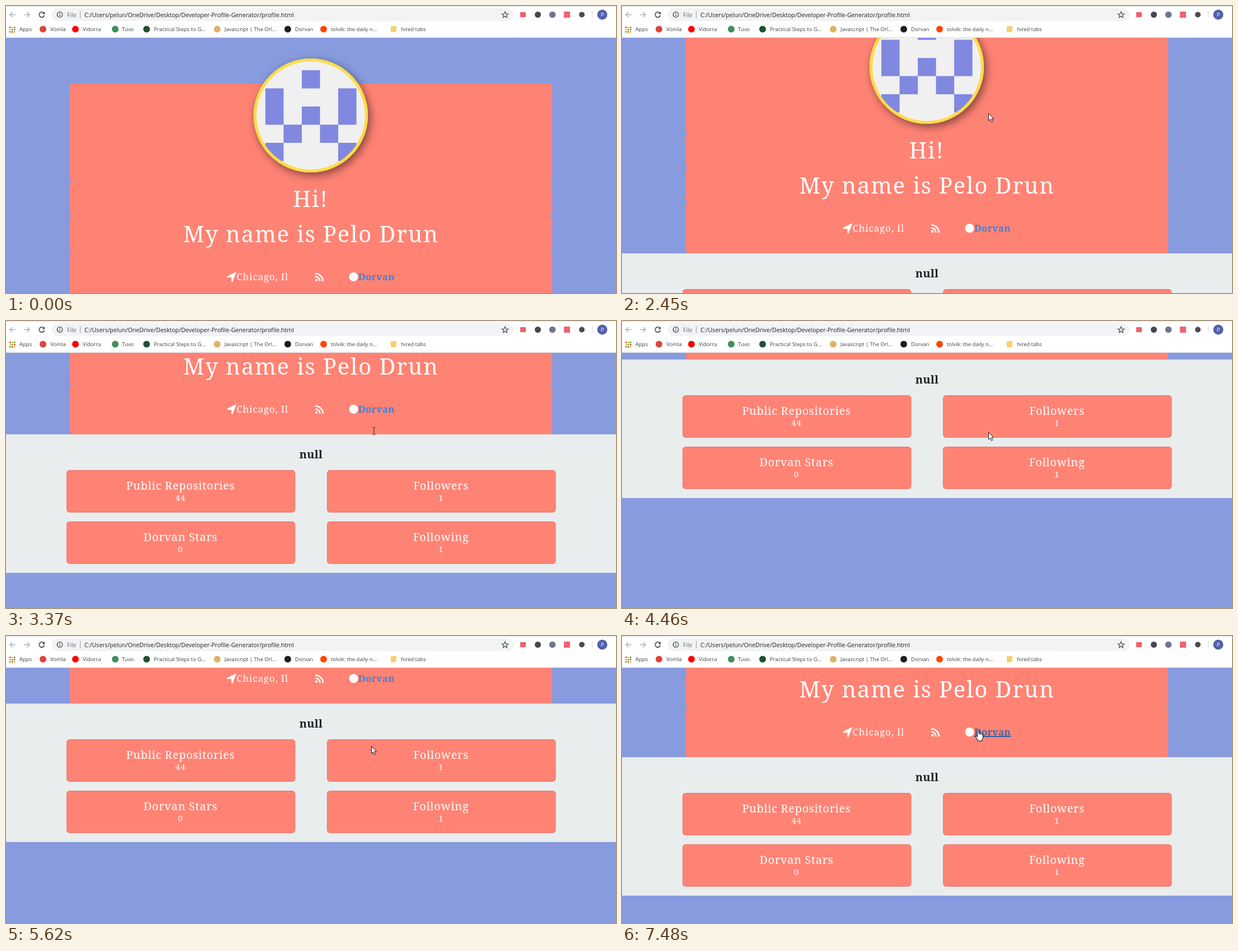
An HTML page for the animation above (8 s loop, 1089 by 514 pixels).

```html
<!DOCTYPE html>
<html lang="en">
<head>
<meta charset="utf-8">
<title>Profile page</title>
<style>
html, body { margin: 0; width: 100%; height: 100%; overflow: hidden; background: #879bde; }
svg { display: block; }
text { white-space: pre; }
.slab { font-family: "Noto Serif", serif; fill: #fff; }
.ui { font-family: "Open Sans", sans-serif; fill: #3c4043; }
</style>
</head>
<body>
<svg id="stage" width="1089" height="514" viewBox="0 0 1089 514">
  <defs>
    <clipPath id="view"><rect y="57" width="1089" height="457"/></clipPath>
    <clipPath id="disc"><circle cx="544" cy="196" r="98"/></clipPath>
    <filter id="shade" x="-30%" y="-30%" width="160%" height="160%">
      <feDropShadow dx="4" dy="5" stdDeviation="8" flood-color="#000" flood-opacity=".5"/>
    </filter>
  </defs>
  <rect width="1089" height="514" fill="#879bde"/>
  <g clip-path="url(#view)"><g id="page"></g></g>
  <g id="bar"></g>
  <g id="cursor">
    <path id="arrow" d="M.5 .5V13.5L3.5 10.7L5.5 15.3L7.7 14.4L5.7 9.8H9.6Z" fill="#fff" stroke="#000" stroke-width=".9"/>
    <path id="beam" d="M-2.5 -6.5H-.5M.5 -6.5H2.5M-2.5 6.5H-.5M.5 6.5H2.5M0 -6V6" fill="none" stroke="#222"/>
    <path id="hand" d="M-1.3 1Q0 -1 1.3 1V6Q3 5 4 6.5Q6 5.800 6.500 7.500Q8.500 7 8.500 9V13L7 16V19H-1V17L-4.500 11.500Q-5 9.500 -3 10L-1.300 11.500Z" fill="#fff" stroke="#000"/>
  </g>
</svg>
<script>
const $ = id => document.getElementById(id);
const rect = (x, y, w, h, fill, more = '') =>
  `<rect x="${x}" y="${y}" width="${w}" height="${h}" fill="${fill}" ${more}/>`;
const dot = (x, y, r, fill, more = '') => `<circle cx="${x}" cy="${y}" r="${r}" fill="${fill}" ${more}/>`;
const line = (d, color, width = 1) => `<path d="${d}" fill="none" stroke="${color}" stroke-width="${width}"/>`;
const label = (cls, x, y, size, str, more = '') =>
  `<text class="${cls}" x="${x}" y="${y}" font-size="${size}" ${more}>${str}</text>`;
const slab = (x, y, size, gap, str, more = '') =>
  label('slab', x, y, size, str, `letter-spacing="${gap}" ${more}`);
const mid = 'text-anchor="middle"';

function avatar() {
  const rows = ['00100', '10001', '10101', '01010', '10001'];
  const cells = rows.map((row, j) => [...row].map((c, i) =>
    c === '1' ? rect(463 + i * 32.5, 115 + j * 32.5, 32.6, 32.6, '#8088e0') : '').join('')).join('');
  return dot(544, 196, 102, '#ffdc4a', 'filter="url(#shade)"') + dot(544, 196, 97, '#f0f0f0') +
    `<g clip-path="url(#disc)">${cells}</g>` +
    dot(544, 196, 99.5, 'none', 'stroke="#ffdc4a" stroke-width="5"');
}

function stat(x, y, name, count) {
  return rect(x + .5, y + .5, 407.5, 75, '#ff8374', 'rx="5" stroke="#e0776c"') +
    slab(x + 203.5, y + 35, 20, .65, name, mid) + slab(x + 203.5, y + 55, 15, .8, count, mid);
}

function page() {
  const cards = [[139, 175], [314, 63], [377, 63], [440, 90]]
    .map(([y, h]) => rect(114, y, 861, h, '#ff8374', 'rx="5"')).join('');
  return cards + avatar() +
    slab(544, 360, 40, 1.8, 'Hi!', mid) +
    slab(544.5, 423, 40, 1.8, 'My name is Pelo Drun', mid) +
    '<path d="M411 477.500L404.500 493.500Q403 495 402.500 493V486H395.500Q393 485 395 484L409.500 476.500Q411 476 411 477.500Z" fill="#fff"/>' +
    slab(411.5, 491, 17, .8, 'Chicago, Il') +
    dot(554.2, 490.8, 2.2, '#fff') +
    line('M552 484.500A8.500 8.500 0 0 1 560.500 493M552 479.200A13.800 13.800 0 0 1 565.800 493', '#fff', 2.5) +
    dot(620.5, 485, 8, '#fff') +
    slab(629, 491, 17, .8, 'Dorvan', 'id="link"') +
    rect(0, 530, 1089, 248, '#e9edee') +
    slab(544.5, 573, 20, .2, 'null', mid + ' font-weight="700" style="fill:#212529"') +
    stat(108, 594, 'Public Repositories', 44) + stat(573, 594, 'Followers', 1) +
    stat(108, 686, 'Dorvan Stars', 0) + stat(573, 686, 'Following', 1);
}

function bar() {
  const marks = [
    [24, 'Apps'], [79, 'Vomla', 66, '#e0443a'], [137, 'Vidorra', 124, '#f00'],
    [207, 'Tuvo', 195, '#3f8f5b'], [264, 'Practical Steps to G...', 251, '#1f5130'],
    [390, 'Javascript | The Orl...', 377, '#e0b267'], [516, 'Dorvan', 503, '#1b1f23'],
    [580, 'tolvik: the daily n...', 567, '#ff4500'], [705, 'hired tabs']
  ];
  const hues = ['#ea4335', '#fbbc05', '#34a853'];
  let out = rect(0, 0, 1089, 57, '#fff') + rect(0, 0, 1089, 1, '#dfe1e5') + rect(0, 56, 1089, 1, '#dcdee2') +
    line('M17 15.500H7M11.500 11L7 15.500L11.500 20M32 15.500H42M37.500 11L42 15.500L37.500 20', '#a9aec4', 1.4) +
    line('M67.500 12.500A4.700 4.700 0 1 0 68.500 16.500', '#3c4043', 1.5) + '<path d="M69 10V14.500H64.500Z" fill="#3c4043"/>' +
    rect(82, 4, 824, 23, '#f1f3f4', 'rx="11.5"') +
    dot(96, 15.5, 4.8, 'none', 'stroke="#3c4043" stroke-width="1.2"') +
    rect(95.4, 14.8, 1.2, 3.4, '#3c4043') + rect(95.4, 12.6, 1.2, 1.3, '#3c4043') +
    label('ui', 109, 19.5, 10.6, 'File', 'style="fill:#6b6f74"') + rect(132, 9, 1, 13, '#9aa0a6') +
    label('ui', 140, 19.5, 10.6, 'C:/Users/pelun/OneDrive/Desktop/Developer-Profile-Generator/profile.html', 'style="fill:#202124"') +
    line('M891 10L892.500 14L896.700 14.200L893.400 16.800L894.500 20.800L891 18.500L887.500 20.800L888.600 16.800L885.300 14.200L889.500 14Z', '#3c4043', 1.1) +
    rect(918, 11, 10, 9, '#f0606a') + dot(949.5, 15.5, 5.5, '#47464f') +
    dot(975.5, 15.5, 5.8, '#6f7691') + rect(996, 10, 11, 11, '#ee6470') + dot(1028, 15.5, 5, '#4c4c4c') +
    rect(1046, 9, 1, 13, '#d5d7da') + dot(1064.5, 15.5, 9, '#5060ab') +
    label('ui', 1064.5, 19, 9.5, 'P', mid + ' style="fill:#fff"');
  for (let i = 0; i < 9; i++)
    out += rect(6 + i % 3 * 4, 37 + (i / 3 | 0) * 4, 2.6, 2.6, hues[(i + (i / 3 | 0)) % 3]);
  for (const [x, name, cx, fill] of marks)
    out += (cx ? dot(cx, 41.5, 6, fill) : '') + label('ui', x, 45, 9.5, name);
  return out + '<path d="M687 36H697V44L694.500 47H687Z" fill="#fbd06b"/>';
}

// Bursts of activity: start, end, steps
const bursts = [
  [440, 600, 3], [830, 1140, 5], [2220, 2600, 6], [2760, 3530, 11], [3620, 3620, 2],
  [4160, 4920, 11], [5080, 5160, 2], [5390, 5780, 6], [6090, 6850, 11], [6940, 7480, 8]
];
const scrollKeys = [
  [2144, 0], [2296, 28], [2448, 87], [2600, 163], [2690, 163], [3000, 240], [3376, 327],
  [3530, 407], [3620, 408], [4084, 408], [4312, 425], [4464, 461], [4844, 624], [4920, 640],
  [5312, 640], [5624, 408.5], [5780, 313]
];
const mouseKeys = [
  [440, 990, 478], [520, 790, 325], [600, 638, 224], [753, 638, 224], [1140, 654, 192],
  [2760, 654, 192], [2914, 657, 197], [3376, 657, 197], [3530, 654, 199], [5000, 654, 199],
  [5160, 652, 197], [6014, 652, 197], [6470, 485, 172], [6550, 485, 172], [6850, 551, 168],
  [6863, 551, 168], [7400, 634, 169], [7480, 636, 169]
];

function snap(t) {
  const burst = bursts.findLast(b => b[0] <= t + 5);
  if (!burst) return 0;
  const [a, b, n] = burst, step = (b - a) / (n - 1) || 1;
  return Math.min(b, a + Math.floor((t - a + 5) / step) * step);
}

function at(keys, t, col = 1) {
  const i = keys.findIndex(k => k[0] >= t);
  if (i < 0) return keys.at(-1)[col];
  if (i === 0) return keys[0][col];
  const p = keys[i - 1], q = keys[i];
  return p[col] + (q[col] - p[col]) * (t - p[0]) / (q[0] - p[0]);
}

const show = (id, on) => $(id).setAttribute('visibility', on ? 'visible' : 'hidden');

function draw(now) {
  const t = snap(now % 8000);
  const x = at(mouseKeys, t), y = at(mouseKeys, t, 2);
  const hand = t > 6850 && x > 629;
  const beam = (t > 2900 && t < 3500) || (t > 6090 && x < 506);
  $('page').setAttribute('transform', `translate(0 ${-Math.round(at(scrollKeys, t))})`);
  $('cursor').setAttribute('transform', `translate(${Math.round(x)} ${Math.round(y)})`);
  const shown = t >= 440;
  show('hand', shown && hand);
  show('beam', shown && beam);
  show('arrow', shown && !hand && !beam);
  $('link').style.fill = hand ? '#0056b3' : '#007bff';
  $('link').style.textDecoration = hand ? 'underline' : 'none';
}

$('page').innerHTML = page();
$('bar').innerHTML = bar();
const start = performance.now();
function loop() {
  draw(performance.now() - start);
  requestAnimationFrame(loop);
}
loop();
</script>
</body>
</html>
```
